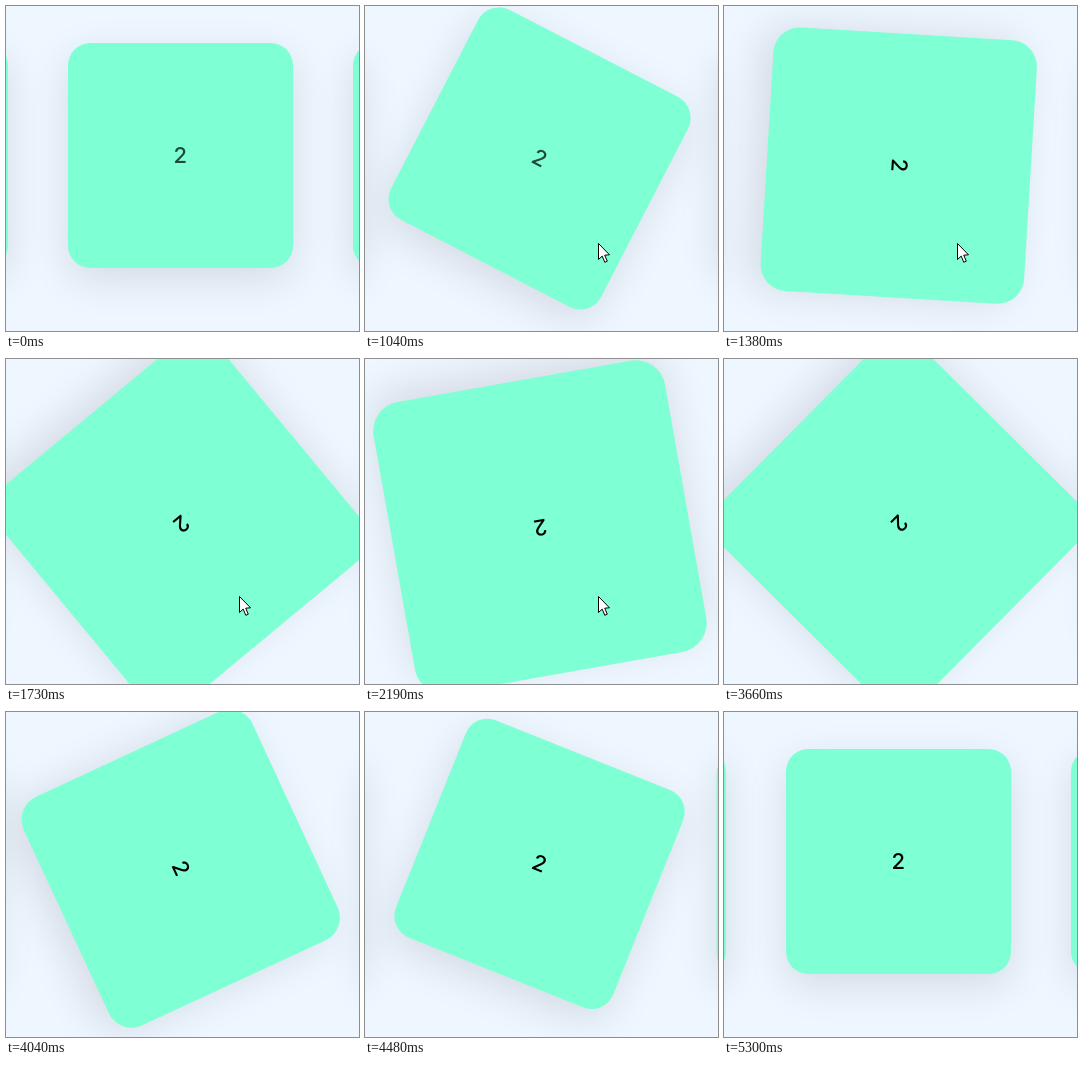
Recreate the animation shown at these times as an HTML page with a canvas. Size 353x325 px, loop 5.93 s.

```html
<!DOCTYPE html>
<html lang="en">
<head>
<meta charset="utf-8">
<title>Rotating card</title>
<style>
  html, body { margin: 0; width: 100%; height: 100%; overflow: hidden; background: #eef6ff; }
  canvas { display: block; }
</style>
</head>
<body>
<canvas id="stage" width="353" height="325"></canvas>
<script>
const LOOP = 5930;
const HOVER = 775, LEAVE = 3300, TURN = 2000;
const SMALL = 225, LARGE = 300, GAP = 60;
const ctx = document.getElementById('stage').getContext('2d');

const clamp = v => Math.min(1, Math.max(0, v));
const mix = (a, b, p) => a + (b - a) * p;
const bezier = (a, b, t) => 3 * a * t * (1 - t) ** 2 + 3 * b * t * t * (1 - t) + t ** 3;

// CSS "ease": cubic-bezier(.25, .1, .25, 1)
function ease(x) {
  if (x <= 0 || x >= 1) return clamp(x);
  let lo = 0, hi = 1;
  for (let i = 0; i < 24; i++) {
    const mid = (lo + hi) / 2;
    if (bezier(0.25, 0.25, mid) < x) lo = mid; else hi = mid;
  }
  return bezier(0.1, 1, lo);
}

function card(x, y, size, angle, label, ink) {
  ctx.save();
  ctx.translate(x, y);
  ctx.rotate(angle);
  // Canvas shadow offsets ignore the transform, so turn them by hand.
  ctx.shadowColor = 'rgba(0, 0, 0, 0.11)';
  ctx.shadowBlur = 42;
  ctx.shadowOffsetX = -12 * Math.sin(angle);
  ctx.shadowOffsetY = 12 * Math.cos(angle);
  ctx.fillStyle = '#7fffd4';
  ctx.beginPath();
  ctx.roundRect(-size / 2, -size / 2, size, size, size * 0.1);
  ctx.fill();
  ctx.shadowColor = 'transparent';
  if (label) {
    ctx.fillStyle = ink;
    ctx.font = '500 22px Inter, sans-serif';
    ctx.textAlign = 'center';
    ctx.fillText(label, -0.3, 7.3);
  }
  ctx.restore();
}

function pointer(x, y) {
  ctx.save();
  ctx.translate(x + 0.5, y + 0.5);
  ctx.beginPath();
  ctx.moveTo(0, 0);
  for (const [px, py] of [[0, 16], [3.7, 12.6], [6.3, 18.8], [8.8, 17.7], [6.2, 11.7], [11, 11.3]]) {
    ctx.lineTo(px, py);
  }
  ctx.closePath();
  ctx.fillStyle = '#fff';
  ctx.strokeStyle = '#000';
  ctx.fill();
  ctx.stroke();
  ctx.restore();
}

function drawPointer(t) {
  if (t < 580 || t > 3360) return;
  if (t < 3160) {
    const p = 1 - (1 - clamp((t - 580) / 400)) ** 2;
    pointer(mix(226, 233, p), mix(325, 237, p));
  } else {
    const p = clamp((t - 3160) / 180) ** 1.3;
    pointer(mix(233, 230, p), mix(237, 330, p));
  }
}

function draw(t) {
  const p = t < LEAVE ? ease((t - HOVER) / TURN) : 1 - ease((t - LEAVE) / TURN);
  const size = mix(SMALL, LARGE, p);
  const x = mix(174.5, 175, p), y = mix(149.5, 169, p);
  const reach = size / 2 + GAP + SMALL / 2;

  ctx.fillStyle = '#eef6ff';
  ctx.fillRect(0, 0, 353, 325);
  card(x - reach, y, SMALL, 0);
  card(x + reach, y, SMALL, 0);
  card(x, y, size, Math.PI * p, '2', t < 1200 ? '#1f4a3c' : '#000');
  drawPointer(t);
}

function tick() {
  draw(performance.now() % LOOP);
  requestAnimationFrame(tick);
}
tick();
</script>
</body>
</html>
```
